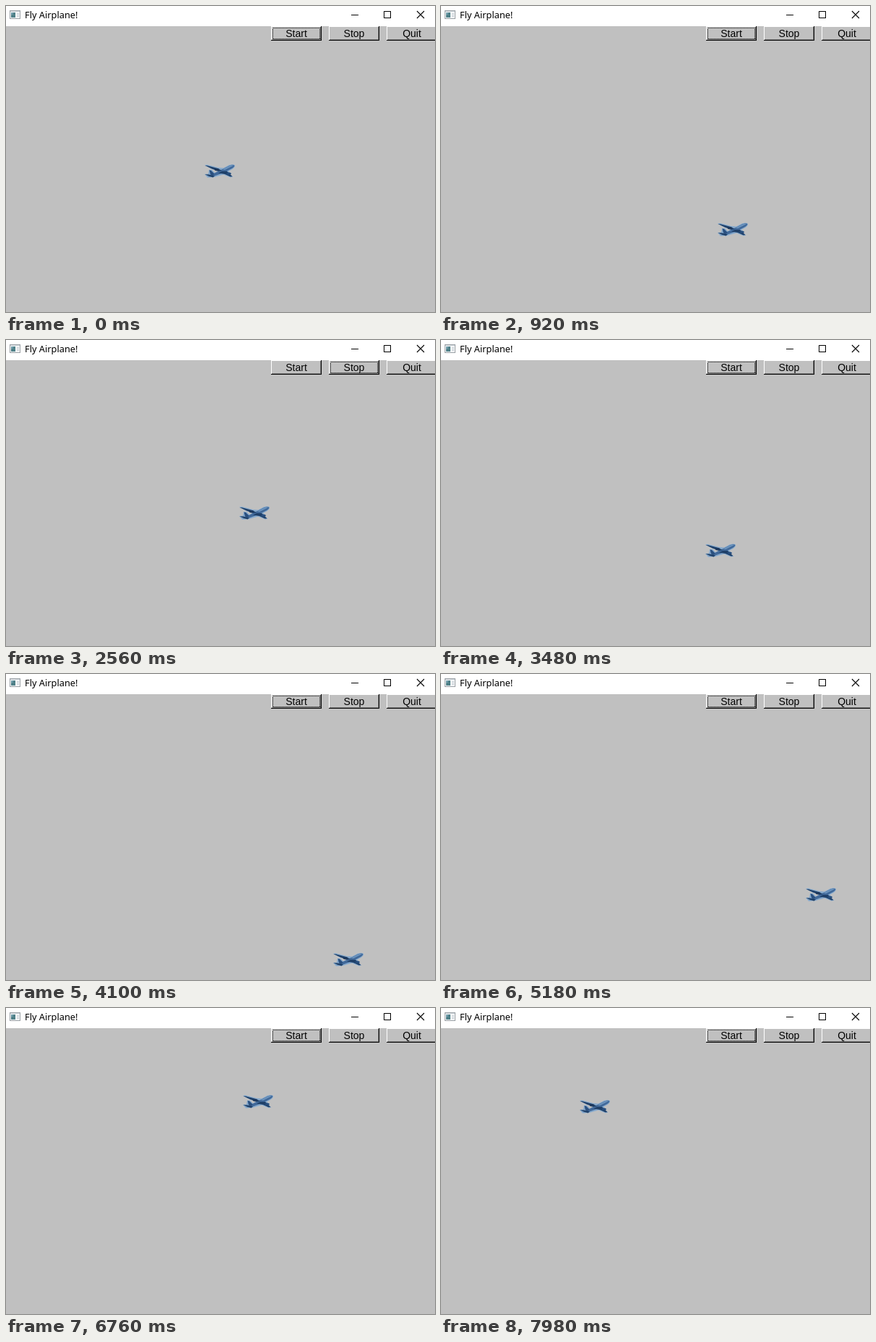
An HTML page that plays this animation: 594x424 px, repeating every 8 s.

```html
<!DOCTYPE html>
<html lang="en">
<head>
<meta charset="utf-8">
<title>Fly Airplane!</title>
<style>
  html, body { margin: 0; width: 100%; height: 100%; overflow: hidden; background: #c0c0c0; }
  svg { display: block; width: 594px; height: 424px; }
  .title { font: 12.8px "Noto Sans", "Open Sans", sans-serif; }
  .label { font: 14px "Liberation Sans", Arial, sans-serif; text-anchor: middle; }
  .crisp { shape-rendering: crispEdges; }
</style>
</head>
<body>
<svg viewBox="0 0 594 424">
  <rect width="594" height="424" fill="#c0c0c0"/>
  <rect width="594" height="28" fill="#fff"/>

  <g class="crisp">
    <rect x="5.5" y="6.5" width="14" height="11" fill="#f4f6f7" stroke="#9aa0a5"/>
    <path d="M6 7.5h13" stroke="#c9d0d6"/>
    <rect x="7" y="9" width="6" height="7" fill="#4f8088"/>
    <rect x="7" y="9" width="3" height="3" fill="#6c9aa8"/>
    <path d="M15 10.5h3M15 12.5h3M15 14.5h3" stroke="#c3cbd2"/>
  </g>
  <text class="title" x="26" y="17">Fly Airplane!</text>

  <g fill="none" stroke="#000">
    <path class="crisp" d="M478 12.5h10M523.5 7.5h9v9h-9z"/>
    <path d="M569 7l10 10M579 7l-10 10" stroke-width="1.1"/>
  </g>

  <g id="buttons"></g>

  <g id="plane">
    <path fill="#86a9cc" d="M0 1.5L3 .8 19 5 26 5.5 34 1.2Q40-.5 42 1.8 42.500 4 38.500 7L33 10 37 13.500 35 15 39.500 17.500 36 18.500 26 14.500 13 18.200 4 18.800 0 14 5 13.500 6 8 10 8 14 12 19 9.500 10 7Z"/>
    <path fill="#41699a" d="M5 17.500L14 12.500 26 6.500 34 2.500Q39.500.5 41.300 2 41.500 4 38 6L27 11.800 13 16.800Z"/>
    <path fill="#6f97c0" d="M25 7.500L34 3Q38 1.300 40 2L28 8Z"/>
    <path fill="#1f4069" d="M.5 2L4 2.200 18 6 24 9 19 10 10 6.500Z"/>
    <path fill="#1f4069" d="M19 12.500L24 10 31 10 38.500 17.300 35.500 17.500 28 14Z"/>
    <path fill="#2a5080" d="M6.500 8.500L9 9 13.500 13.500 11.500 16 8 14.500Z"/>
    <path fill="#1f4069" d="M.5 14.300L6 14.500 14 16.500 11.500 18.500 5 16.500Z"/>
    <ellipse cx="17" cy="7.800" rx="3.200" ry="1.700" fill="#1b375d"/>
    <ellipse cx="33.500" cy="13.300" rx="3.200" ry="1.700" fill="#284e7d"/>
  </g>
</svg>

<script>
const LOOP = 8000;
const xs = [[350, 275], [1797, 549], [2560, 323], [3171, 323], [4786, 549], [7980, 192]];
const ys = [[350, 219], [1660, 404], [2560, 230], [3171, 230], [4207, 404], [7586, 28], [7980, 127]];

const button = (label, x) => `
  <g transform="translate(${x} 28)">
    <g class="crisp" fill="none">
      <path d="M.5 20V.5H70" stroke="#fff"/>
      <path d="M1 18.500H68.500V1" stroke="#808080"/>
      <path d="M0 19.500H69.500V0" stroke="#000"/>
      <rect class="focus" x="2.500" y="2.500" width="65" height="15" stroke="#000" stroke-dasharray="1 1"/>
    </g>
    <text class="label" x="35" y="15">${label}</text>
  </g>`;

document.getElementById("buttons").innerHTML =
  ["Start", "Stop", "Quit"].map((label, i) => button(label, 367 + 80 * i)).join("");

const plane = document.getElementById("plane");
const focus = document.querySelectorAll(".focus");

// Straight flight between wall hits
function at(keys, t) {
  if (t <= keys[0][0]) return keys[0][1];
  for (let i = 1; i < keys.length; i++) {
    const [t0, a] = keys[i - 1], [t1, b] = keys[i];
    if (t <= t1) return a + (b - a) * (t - t0) / (t1 - t0);
  }
  return keys[keys.length - 1][1];
}

function draw(t) {
  plane.setAttribute("transform", `translate(${Math.round(at(xs, t))} ${Math.round(at(ys, t))})`);
  const active = t >= 1920 && t < 3120 ? 1 : 0;
  focus.forEach((box, i) => box.setAttribute("visibility", i === active ? "visible" : "hidden"));
}

const start = performance.now();
function tick() {
  draw((performance.now() - start) % LOOP);
  requestAnimationFrame(tick);
}
tick();
</script>
</body>
</html>
```
